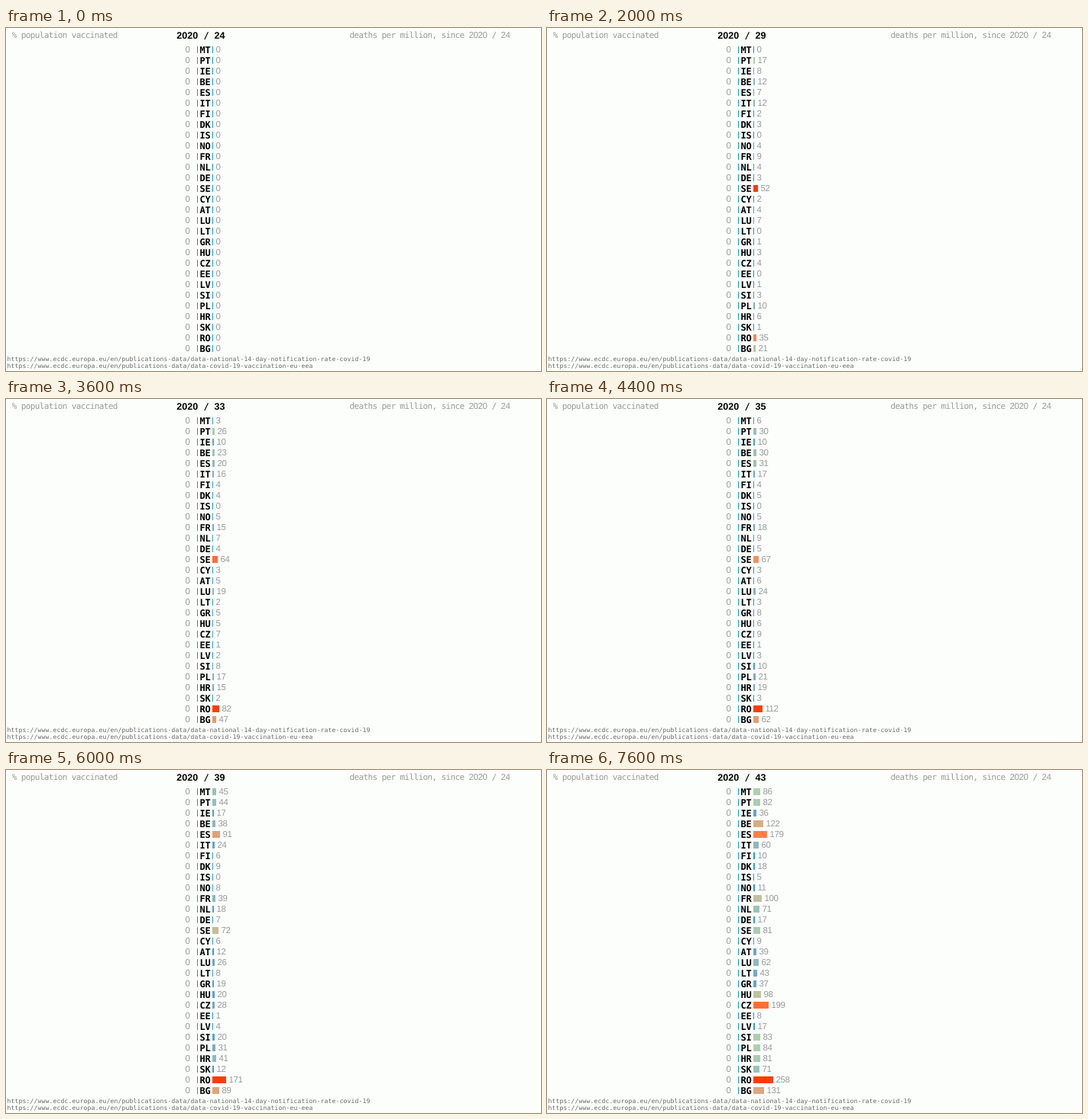
Animation, 700 px wide and 450 px high, one loop 8 s. Source, as an HTML page:

```html
<!DOCTYPE html>
<html lang="en">
<head>
<meta charset="utf-8">
<title>Vaccinations and deaths per week</title>
<style>
  html, body { margin: 0; width: 100%; height: 100%; overflow: hidden; background: #fcfefc; }
  svg { display: block; width: 700px; height: 450px; }
  text { white-space: pre; text-rendering: geometricPrecision; }
  rect { shape-rendering: crispEdges; }
  .mono { font: 11px "DejaVu Sans Mono", monospace; letter-spacing: -.62px; fill: #999; }
  .num { font: 11.5px "Liberation Sans", sans-serif; letter-spacing: -.4px; fill: #999; }
  .code { font: bold 12px "DejaVu Sans Mono", monospace; letter-spacing: -.22px; fill: #000; }
  .date { font: bold 12.5px "Liberation Sans", sans-serif; letter-spacing: .05px; fill: #000; }
  .link { font: 8px "DejaVu Sans Mono", monospace; letter-spacing: .184px; fill: #666; }
</style>
</head>
<body>
<svg id="stage" viewBox="0 0 700 450"></svg>
<script>
const STEP = 400, LOOP = 8000, FIRST = 24;

// Cumulative deaths at the given weeks; gaps are interpolated.
const WEEKS = [27, 31, 35, 39, 41, 43];
const DEATHS = {
  MT: [, 0, 6, 45, , 86],
  PT: [11, 22, 30, 44, 57, 82],
  IE: [6, 9, 10, 17, 24, 36],
  BE: [9, 15, 30, 38, 58, 122],
  ES: [5, 9, 31, 91, 130, 179],
  IT: [9, 14, 17, 24, 31, 60],
  FI: [, 3, 4, 6, , 10],
  DK: [2, 3, 5, 9, 12, 18],
  IS: [, , , 0, , 5],
  NO: [3, , 5, 8, , 11],
  FR: [6, , 18, 39, 59, 100],
  NL: [3, 5, 9, 18, 35, 71],
  DE: [2, 3, , 7, 10, 17],
  SE: [42, 61, , 72, 75, 81],
  CY: [2, , 3, 6, 9, 9],
  AT: [3, 4, 6, 12, 21, 39],
  LU: [0, 13, 24, 26, 40, 62],
  LT: [, 0, 3, 8, 16, 43],
  GR: [, 2, 8, 19, 25, 37],
  HU: [3, 3, 6, 20, 44, 98],
  CZ: [, 5, 9, 28, 69, 199],
  EE: [, 0, 1, 1, 4, 8],
  LV: [, , , 4, 6, 17],
  SI: [0, , 10, 20, 31, 83],
  PL: [7, 13, 21, 31, 46, 84],
  HR: [1, , 19, 41, 53, 81],
  SK: [, 1, 3, 12, 27, 71],
  RO: [18, 52, , 171, 207, 258],
  BG: [10, 31, 62, 89, 103, 131]
};

// Bar colour by share of the highest value
const RAMP = [
  [0, [0, 153, 230]],
  [.17, [114, 170, 204]],
  [.33, [176, 208, 172]],
  [.5, [220, 168, 128]],
  [.69, [255, 128, 72]],
  [1, [255, 60, 0]]
];

const stage = document.getElementById('stage');

function add(tag, attrs, content = '') {
  const el = document.createElementNS('http://www.w3.org/2000/svg', tag);
  for (const key in attrs) el.setAttribute(key, attrs[key]);
  el.textContent = content;
  return stage.appendChild(el);
}
const label = (cls, x, y, content) => add('text', { class: cls, x, y }, content);
const bar = (x, y) => add('rect', { x, y, width: 1, height: 9, fill: color(0) });

// Finds the segment of sorted [position, value] points around p
function segment(points, p) {
  let i = 1;
  while (i < points.length - 1 && points[i][0] < p) i++;
  const [a, from] = points[i - 1], [b, to] = points[i];
  return { from, to, k: (p - a) / (b - a) };
}
const mix = (a, b, k) => Math.round(a + (b - a) * k);

function color(share) {
  const { from, to, k } = segment(RAMP, share);
  return `rgb(${from.map((c, i) => mix(c, to[i], k))})`;
}

function valueAt(points, week) {
  const { from, to, k } = segment(points, week);
  return mix(from, to, k);
}

label('mono', 7.7, 13, '% population vaccinated');
label('mono', 449.5, 13, 'deaths per million, since');
label('num', 605.5, 13, '2020');
label('mono', 635.5, 13, '/');
label('num', 647.5, 13, FIRST);
label('date', 223.2, 13.8, '2020');
label('code', 258.5, 13.8, '/');
const weekLabel = label('date', 272.5, 13.8, FIRST);
label('link', 1.5, 437, 'https://www.ecdc.europa.eu/en/publications-data/data-national-14-day-notification-rate-covid-19');
label('link', 1.5, 446, 'https://www.ecdc.europa.eu/en/publications-data/data-covid-19-vaccination-eu-eea');

const rows = Object.entries(DEATHS).map(([code, values], i) => {
  const y = 24 + 14 * i, points = [[FIRST, 0]];
  values.forEach((v, j) => points.push([WEEKS[j], v]));
  label('num', 234.4, y + 8.3, 0);
  bar(250, y);
  label('code', 253.5, y + 8.7, code);
  return { points, bar: bar(270, y), num: label('num', 274.4, y + 8.3, 0) };
});

function draw(week) {
  const values = rows.map(r => valueAt(r.points, week));
  const top = Math.max(1, ...values);
  weekLabel.textContent = week;
  rows.forEach((r, i) => {
    const length = Math.floor(values[i] / 10);
    r.bar.setAttribute('width', length + 1);
    r.bar.setAttribute('fill', color(values[i] / top));
    r.num.setAttribute('x', 274.4 + length);
    r.num.textContent = values[i];
  });
}

let shown = 0;
function tick() {
  const week = FIRST + Math.floor(performance.now() % LOOP / STEP);
  if (week !== shown) draw(shown = week);
  requestAnimationFrame(tick);
}
tick();
</script>
</body>
</html>
```
